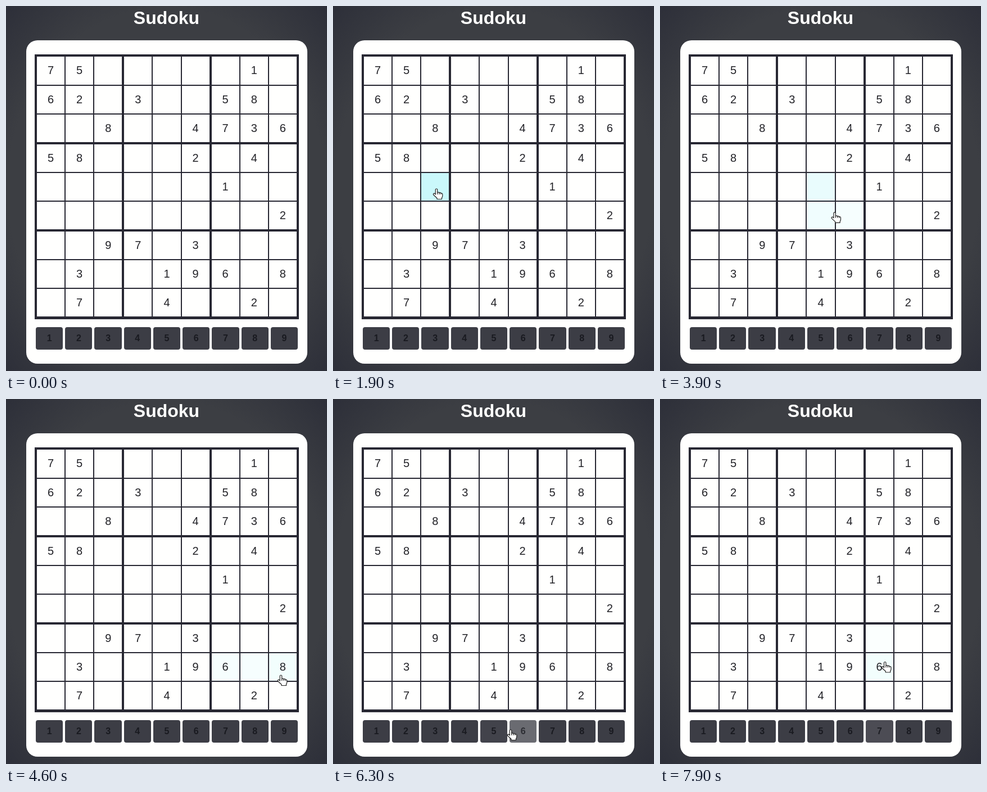
These frames come from a looping animation (571x649 px, 8 s). An HTML page with a canvas:

```html
<!DOCTYPE html>
<html lang="en">
<head>
<meta charset="utf-8">
<title>Sudoku</title>
<style>
  html, body { margin: 0; width: 100%; height: 100%; overflow: hidden; }
  canvas { display: block; }
</style>
</head>
<body>
<canvas id="stage" width="571" height="649"></canvas>
<script>
const ctx = document.getElementById('stage').getContext('2d');
const LOOP = 8000, FADE = 250, LEAD = 50, STEP = 10;
const INK = '#282833', PAPER = '#fffffe', FONT = '"Liberation Sans", Arial, sans-serif';
const LEFT = 55, TOP = 90.4;

const PUZZLE = [
  '75.....1.', '62.3..58.', '..8..4736',
  '58...2.4.', '......1..', '........2',
  '..97.3...', '.3..196.8', '.7..4..2.'
];

// Offset of the i-th row or column; thick lines follow every third one.
const offset = i => 155.3 * Math.floor(i / 3) + 51.15 * (i % 3);
const cellStart = (origin, i) => Math.round(origin + offset(i));
const cellEnd = (origin, i) => cellStart(origin, i + 1) - (i % 3 === 2 ? 4 : 2);
const buttonLeft = i => 53 + 52.23 * i;
const BUTTON_WIDTH = 48.25;

// Pointer moves: start time, end time, destination x, y
const ENTRY = [495, 322];
const MOVES = [
  [500, 1100, 203, 326], [1500, 1800, 183, 326], [1900, 1980, 182, 272],
  [2450, 2800, 247, 325], [3200, 3300, 284, 325], [3600, 4440, 372, 472],
  [4440, 4540, 445, 484], [4580, 4600, 488, 492], [4700, 5200, 490, 592],
  [5360, 5500, 463, 592], [5500, 6280, 316, 589], [6280, 6800, 77, 590],
  [7100, 7600, 395, 590], [7720, 7960, 400, 446]
];

const HAND = new Path2D('M-1.7 10V1.5Q-1.7 0 0 0T1.7 1.5V6.5Q4 5.5 5 7Q7 6.2 8 7.8Q10.8 7.5 10.8 10V13Q10.5 15 9.5 16V18.5H1V16.5Q-2.5 13.5-5.5 10.5Q-6 8-3.5 8.2Z');
const KNUCKLES = new Path2D('M1.7 6.5V10M5 7V10M8 8V10');

function pointer(t) {
  if (t < MOVES[0][0]) return null;
  let [x, y] = ENTRY;
  for (const [from, to, toX, toY] of MOVES) {
    const k = Math.min(1, Math.max(0, (t - from) / (to - from)));
    const ease = k * k * (3 - 2 * k);
    x += (toX - x) * ease;
    y += (toY - y) * ease;
  }
  return [x, y];
}

function gridIndex(origin, pos) {
  for (let i = 0; i < 9; i++) {
    if (pos < cellStart(origin, i + 1) - 1) return i;
  }
  return 8;
}

// Cells are numbered 0-80, buttons 81-89.
function hitTest(point) {
  if (!point) return -1;
  const [x, y] = point;
  if (y < 557) return gridIndex(TOP, y) * 9 + gridIndex(LEFT, x);
  if (y < 571) return -1;
  const i = Math.floor((x - buttonLeft(0)) / 52.23);
  return x < buttonLeft(i) + BUTTON_WIDTH ? 81 + i : -1;
}

function hoverLevels(t) {
  const levels = new Array(90).fill(0);
  for (let s = t - 700; s <= t; s += STEP) {
    const hit = hitTest(pointer(s + LEAD));
    for (let i = 0; i < 90; i++) {
      const change = (i === hit ? STEP : -STEP) / FADE;
      levels[i] = Math.min(1, Math.max(0, levels[i] + change));
    }
  }
  return levels;
}

function rect(x, y, w, h, color, radius = 0) {
  ctx.fillStyle = color;
  ctx.beginPath();
  ctx.roundRect(x, y, w, h, radius);
  ctx.fill();
}

function text(str, x, y, font, color) {
  ctx.font = `${font} ${FONT}`;
  ctx.fillStyle = color;
  ctx.fillText(str, x, y);
}

function drawBackdrop() {
  ctx.save();
  ctx.scale(571, 649);
  const g = ctx.createRadialGradient(.5, .5, 0, .5, .5, Math.SQRT1_2);
  g.addColorStop(.7, '#3c3e43');
  g.addColorStop(1, '#2d2f39');
  rect(0, 0, 1, 1, g);
  ctx.restore();
}

function drawCell(r, c, level) {
  const x = cellStart(LEFT, c), y = cellStart(TOP, r);
  const w = cellEnd(LEFT, c) - x, h = cellEnd(TOP, r) - y;
  rect(x, y, w, h, PAPER);
  ctx.globalAlpha = level;
  rect(x, y, w, h, '#c8f8fb');
  ctx.globalAlpha = 1;
  const digit = PUZZLE[r][c];
  if (digit !== '.') text(digit, LEFT + offset(c) + 24.5, y + 31, '20px', '#222227');
}

function drawButton(i, level) {
  const left = buttonLeft(i), x = Math.round(left);
  ctx.globalAlpha = 1 - .3 * level;
  rect(x, 571, Math.round(left + BUTTON_WIDTH) - x, 40, '#3c3d45', 4);
  text(i + 1, left + BUTTON_WIDTH / 2, 596, 'bold 16px', '#191a20');
  ctx.globalAlpha = 1;
}

function drawHand([x, y]) {
  ctx.save();
  ctx.translate(x + 1, y - 1);
  ctx.fillStyle = '#fff';
  ctx.strokeStyle = '#222';
  ctx.lineWidth = 1.2;
  ctx.lineJoin = 'round';
  ctx.fill(HAND);
  ctx.stroke(HAND);
  ctx.stroke(KNUCKLES);
  ctx.restore();
}

function draw(t) {
  const levels = hoverLevels(t);
  ctx.textAlign = 'center';
  drawBackdrop();
  text('Sudoku', 285.5, 32, 'bold 32px', PAPER);
  rect(36, 61, 500, 575, PAPER, 20);
  rect(51, 86, 470, 471, INK);
  for (let i = 0; i < 81; i++) drawCell(Math.floor(i / 9), i % 9, levels[i]);
  for (let i = 0; i < 9; i++) drawButton(i, levels[81 + i]);
  const point = pointer(t);
  if (point) drawHand(point);
}

// The picture advances ten times a second.
const start = performance.now();
let shown = -1;
function tick() {
  const t = Math.floor((performance.now() - start) % LOOP / 100) * 100;
  if (t !== shown) draw(shown = t);
  requestAnimationFrame(tick);
}
tick();
</script>
</body>
</html>
```
